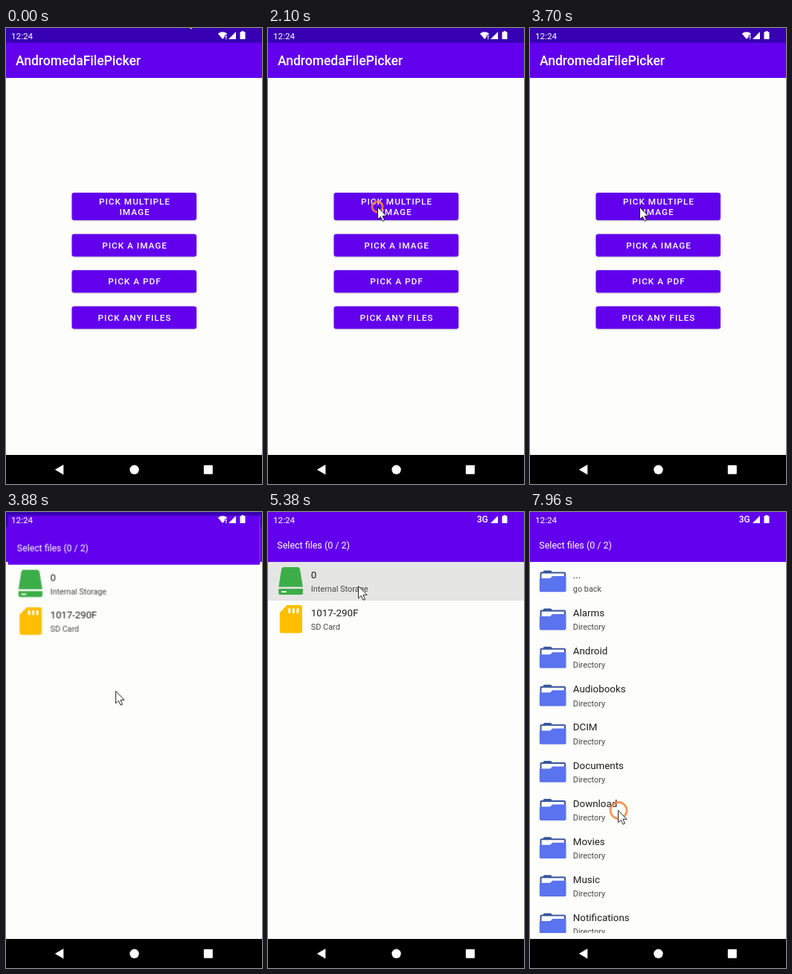
Write an HTML page that moves like this. It is 344 px wide and 612 px high and loops after 8 s.

```html
<!DOCTYPE html>
<html lang="en">
<head>
<meta charset="utf-8">
<title>AndromedaFilePicker</title>
<style>
  html, body { margin: 0; width: 100%; height: 100%; overflow: hidden; background: #fdfdfb; }
  svg { display: block; width: 344px; height: 612px; font-family: Roboto, "Noto Sans", sans-serif; }
  .title { font-size: 17.5px; font-weight: 500; }
  .label { font-size: 11.7px; font-weight: 500; letter-spacing: 1.04px; text-anchor: middle; }
  .name { font-size: 13.35px; fill: #1c1c1c; }
  .note { font-size: 10.88px; fill: #484848; }
  .white { fill: #fff; }
  .page { fill: #fdfdfb; }
  .bar { fill: #6200ee; }
  #picker { transform-origin: 172px 306px; }
</style>
</head>
<body>
<svg viewBox="0 0 344 612">
  <defs>
    <filter id="soft" x="-20%" y="-50%" width="140%" height="200%"><feGaussianBlur stdDeviation="1.2"/></filter>
    <filter id="wide" x="-20%" y="-50%" width="140%" height="200%"><feGaussianBlur stdDeviation="3.5"/></filter>
    <clipPath id="buttonClip"><rect x="88.5" y="221" width="167.5" height="37" rx="3.3"/></clipPath>
    <clipPath id="rowClip"><rect y="67" width="344" height="51.5"/></clipPath>
    <clipPath id="listClip"><rect y="67" width="344" height="498"/></clipPath>
    <g id="folder">
      <path fill="#38569f" d="M13.5 82q0-1.5 1.5-1.5h2.5q.5-2 2-2h8q1.5 0 2 2h16.5q2 0 2 2V95H13.5Z"/>
      <path class="page" d="M15.5 82.5h30.5V92H15.5Z"/>
      <path fill="#5a73ee" d="M12.8 90.5q0-1.5 1.5-1.5H27l3.5-3H47q1.5 0 1.5 1.5V105.5q0 1.8-1.8 1.8H14.6q-1.8 0-1.8-1.8Z"/>
    </g>
  </defs>

  <g id="home">
    <rect class="page" width="344" height="612"/>
    <rect class="bar" width="344" height="67"/>
    <rect width="344" height="20" fill="#3700b3"/>
    <text class="title white" x="13" y="50">AndromedaFilePicker</text>
    <rect id="lift" x="88" y="223" width="168.5" height="38" rx="4" fill="#555" opacity="0" filter="url(#wide)"/>
    <g id="buttons"></g>
    <g clip-path="url(#buttonClip)"><circle id="glow" cx="147" cy="240" r="0" fill="#fff" opacity="0"/></g>
    <g id="labels" class="white"></g>
  </g>

  <g id="picker" opacity="0">
    <rect class="page" width="344" height="612"/>
    <rect class="bar" width="344" height="67"/>
    <text class="white" x="12.3" y="48.7" font-size="12.5">Select files (0 / 2)</text>
    <g id="storage">
      <g clip-path="url(#rowClip)"><circle id="ripple" cx="121" cy="99" r="0" opacity="0"/></g>
      <path fill="#3cae48" d="M18 77q.6-3 3.5-3h18q2.9 0 3.5 3L46.8 100.5H14.3Z"/>
      <path fill="#3cae48" d="M14.2 103H47V108.5q0 2.5-2.5 2.5H16.7q-2.5 0-2.5-2.5Z"/>
      <rect class="white" x="18" y="106.3" width="7" height="1.8" rx=".9"/>
      <path fill="#ffbf00" d="M25.5 125H43.5q2.5 0 2.5 2.5V160q0 2.5-2.5 2.5H18.3q-2.5 0-2.5-2.5V135Z"/>
      <path stroke="#fdfdfb" stroke-width="3" stroke-linecap="round" d="M28.7 130.5v4M34.3 130.5v4M39.9 130.5v4"/>
    </g>
    <g id="list" clip-path="url(#listClip)" opacity="0"></g>
  </g>

  <g class="white">
    <text x="7" y="14.6" font-size="11.7">12:24</text>
    <g id="wifi">
      <path d="M284.8 7.5Q291 2.8 297.2 7.5L295.5 9.5H293.8V12L291 15Z"/>
      <path d="M295 10h1.4v3H295ZM295 13.7h1.4V15H295Z"/>
    </g>
    <text id="cell" x="291.2" y="14.3" font-size="12" font-weight="500" opacity="0">3G</text>
    <path id="signal" d="M309 5V15H299Z"/>
    <path d="M316.7 4h2.6v1.3H321q.5 0 .5.5V14.5q0 .5-.5.5H315q-.5 0-.5-.5V5.8q0-.5.5-.5h1.7Z"/>
  </g>

  <rect y="573" width="344" height="39"/>
  <g class="white">
    <path d="M65.8 592.8L77.3 586V599.5Z"/>
    <circle cx="172.5" cy="592.8" r="6.2"/>
    <rect x="265.8" y="586.8" width="12" height="12" rx="1"/>
  </g>

  <g id="rings" fill="none" stroke="#f58442" stroke-width="2.8"></g>
  <path id="cursor" fill="#fff" stroke="#111" stroke-width=".9" stroke-linejoin="round"
    d="M.5 .5V16.8L4.3 13.3L7 19.2L9.5 18.1L6.9 12.3H12Z"/>
</svg>
<script>
const LOOP = 8000;
const $ = id => document.getElementById(id);

function add(parent, tag, attrs, text = "") {
  const el = document.createElementNS("http://www.w3.org/2000/svg", tag);
  for (const key in attrs) el.setAttribute(key, attrs[key]);
  el.textContent = text;
  return parent.appendChild(el);
}

// Rows are [time, style, easing]; the first and last poses fill out the loop.
function play(el, rows) {
  const first = rows[0], last = rows[rows.length - 1];
  const all = [...rows];
  if (first[0] > 0) all.unshift([0, first[1]]);
  if (last[0] < LOOP) all.push([LOOP, last[1]]);
  el.animate(
    all.map(([time, style, easing = "linear"]) => ({ ...style, easing, offset: time / LOOP })),
    { duration: LOOP, iterations: Infinity }
  );
}

const fade = (el, rows) => play(el, rows.map(([t, opacity, ease]) => [t, { opacity }, ease]));
const flip = (el, rows) => fade(el, rows.map(([t, v]) => [t, v, "steps(1)"]));
const grow = (el, rows) => play(el, rows.map(([t, r, ease]) => [t, { r: r + "px" }, ease]));

function button(y, height, lines) {
  const box = { x: 88.5, width: 167.5, height, rx: 3.3 };
  add($("buttons"), "rect", { ...box, y: y + 1, fill: "#444", opacity: .3, filter: "url(#soft)" });
  add($("buttons"), "rect", { ...box, y, class: "bar" });
  lines.forEach((line, i) => {
    const base = y + height / 2 + 4.2 + (i - (lines.length - 1) / 2) * 13.7;
    add($("labels"), "text", { class: "label", x: 173, y: base }, line);
  });
}

button(221, 37, ["PICK MULTIPLE", "IMAGE"]);
["PICK A IMAGE", "PICK A PDF", "PICK ANY FILES"].forEach((line, i) => button(276.4 + i * 48.5, 30.4, [line]));

function row(parent, i, name, note) {
  const y = i * 51.1;
  add(parent, "text", { class: "name", x: 57.8, y: 89 + y }, name);
  add(parent, "text", { class: "note", x: 57.8, y: 107.2 + y }, note);
}

row($("storage"), 0, "0", "Internal Storage");
row($("storage"), 1, "1017-290F", "SD Card");

["...", "Alarms", "Android", "Audiobooks", "DCIM", "Documents", "Download", "Movies", "Music", "Notifications"]
  .forEach((name, i) => {
    add($("list"), "use", { href: "#folder", y: i * 51.1 });
    row($("list"), i, name, i ? "Directory" : "go back");
  });

// Pointer path: time, x, y, easing
play($("cursor"), [
  [0, 241, -17, "steps(1)"],
  [20, 241, -40, "steps(1)"],
  [800, 240, -14, "steps(1)"],
  [820, 240, -40, "steps(1)"],
  [1000, 241, -20],
  [1140, 243, 111],
  [1300, 222, 184],
  [1420, 188, 226],
  [1520, 166, 238],
  [1700, 166, 238, "ease-in-out"],
  [1880, 147, 240],
  [4380, 147, 240, "ease-in"],
  [4540, 130, 148],
  [4800, 121, 99],
  [6540, 121, 99, "ease-in"],
  [6800, 118, 200],
  [7100, 120, 390],
  [7340, 122, 482],
  [7400, 120, 486],
  [7600, 112, 446],
  [7860, 118, 400]
].map(([t, x, y, ease]) => [t, { transform: `translate(${x}px, ${y}px)` }, ease]));

function ring(cx, cy, start) {
  const el = add($("rings"), "circle", { cx, cy, r: 11, opacity: 0 });
  const end = start + 320;
  const until = (time, value) => [Math.min(time, LOOP), value];
  fade(el, [[start, 0], [start, .85], until(start + 160, .85), until(end, end > LOOP ? .85 : 0)]);
  grow(el, [[start, 7], [start + 60, 11]]);
}

ring(147, 240, 2100);
ring(121, 99, 4980);
ring(119, 400.5, 7900);

// Button press
grow($("glow"), [[2160, 10], [2500, 120]]);
fade($("glow"), [[2140, 0], [2240, .18], [2760, .18], [3140, 0]]);
fade($("lift"), [[2140, 0], [2300, .16], [2900, .16], [3140, .03], [3400, .03], [3400, 0]]);

// Second screen opens
const settle = "cubic-bezier(.2, 0, 0, 1)";
fade($("picker"), [[3720, 0], [3820, 1]]);
play($("picker"), [[3700, { transform: "scale(.85)" }, settle], [4040, { transform: "scale(1)" }]]);

// Storage row press, then the folder list
grow($("ripple"), [[5000, 10], [5320, 240]]);
fade($("ripple"), [[4980, 0], [5060, .11], [5340, .11], [5680, 0]]);
flip($("storage"), [[0, 1], [6340, 0]]);
flip($("list"), [[0, 0], [6340, 1]]);

// Status icons
flip($("wifi"), [[0, 1], [4040, 0]]);
flip($("signal"), [[0, 1], [4040, 0], [4700, 1]]);
flip($("cell"), [[0, 0], [4200, 1]]);
play($("cell"), [
  [0, { transform: "translate(0px, 0px)" }, "steps(1)"],
  [4700, { transform: "translate(-10.5px, 0px)" }, "steps(1)"]
]);
</script>
</body>
</html>
```
